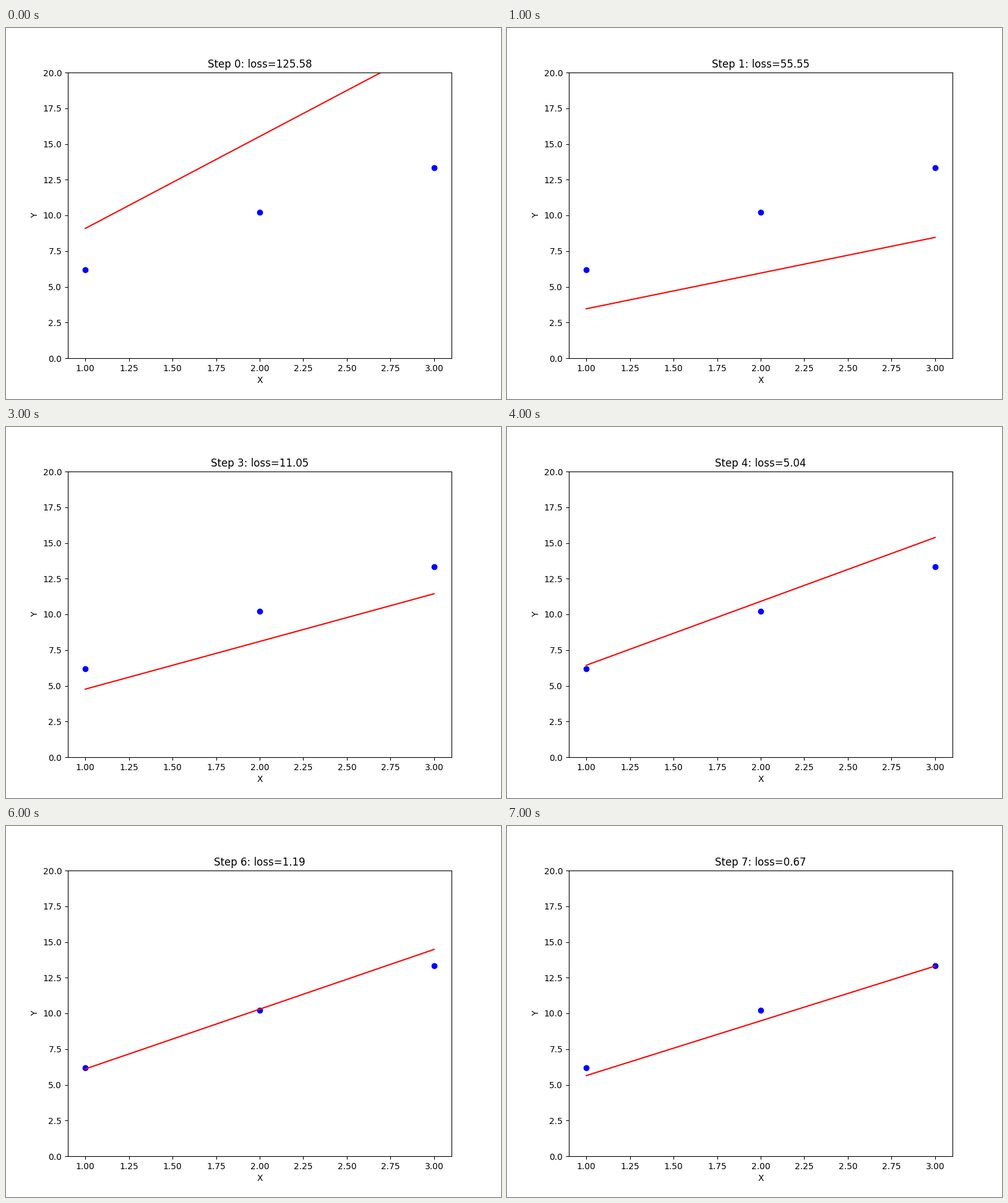
Write a matplotlib script that moves like this. It is 800 px wide and 600 px high and loops after 8000 ms.

```python
import numpy as np
import matplotlib.pyplot as plt
from matplotlib.animation import FuncAnimation

STEPS = 8
RATE = 0.1
X = np.array([1.0, 2.0, 3.0])
Y = np.array([6.18, 10.23, 13.325])
START = (0.55057, 0.00243)  # slope, intercept


def descend():
    """Gradient descent on half the squared error; loss is taken before each update."""
    w, b = START
    history = []
    for _ in range(STEPS):
        error = w * X + b - Y
        loss = 0.5 * np.sum(error ** 2)
        w -= RATE * np.sum(error * X)
        b -= RATE * np.sum(error)
        history.append((w * X + b, loss))
    return history


history = descend()

fig, ax = plt.subplots(figsize=(8, 6), dpi=100)
ax.plot(X, Y, "bo")
line, = ax.plot(X, history[0][0], "r-")
ax.set_xlim(0.9, 3.1)
ax.set_ylim(0, 20)
ax.set_xlabel("X")
ax.set_ylabel("Y")


def update(step):
    fit, loss = history[step]
    line.set_ydata(fit)
    ax.set_title(f"Step {step}: loss={loss:.2f}")
    return line, ax.title


anim = FuncAnimation(fig, update, frames=STEPS, interval=1000, repeat=True, repeat_delay=0)
plt.show()
```
